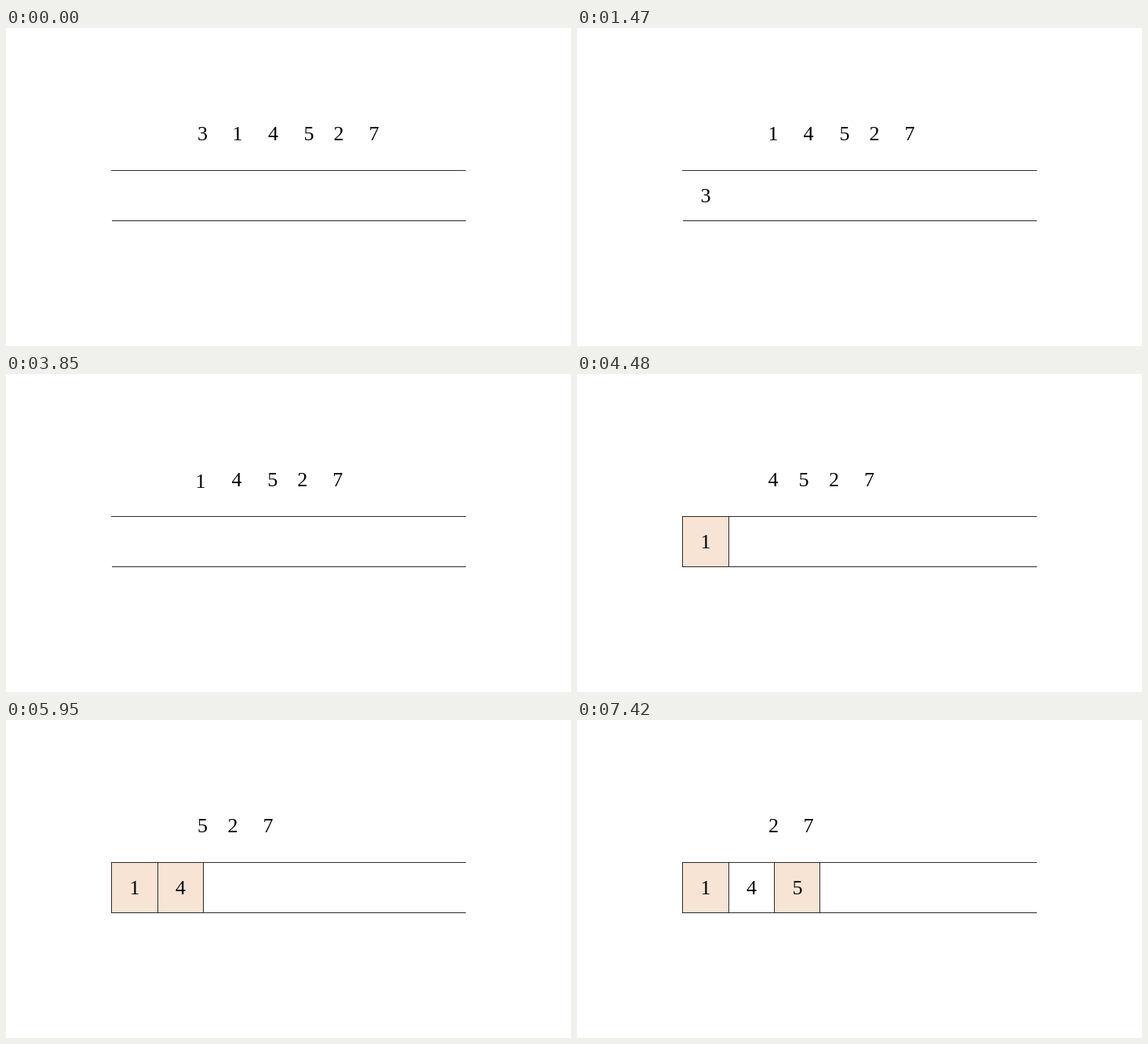
These frames come from a looping animation (720 px wide and 405 px high, 8 s). An HTML page:

```html
<!DOCTYPE html>
<html lang="en">
<head>
<meta charset="utf-8">
<title>Digits entering a stack</title>
<style>
  html, body { margin: 0; width: 100%; height: 100%; overflow: hidden; background: #fff; }
  svg { display: block; width: 720px; height: 405px; }
  text { font: 26px "Liberation Serif", "Times New Roman", serif; text-anchor: middle; fill: #000; }
  rect { shape-rendering: crispEdges; }
  .line { fill: #2a2a2a; }
</style>
</head>
<body>
<svg viewBox="0 0 720 405">
  <rect class="line" x="134" y="181" width="452" height="1"/>
  <rect class="line" x="135" y="245" width="451" height="1"/>
  <g id="cells"></g>
  <g id="digits"></g>
</svg>
<script>
const LOOP = 8000, STEP = 70, STEPS = 10;
const PEACH = '#f8e4d4';
const edges = [134, 193, 251, 309];
const slotCenters = [164, 222.5, 281];
const moveStarts = [910, 3850, 5320, 6790];
const moveEnds = moveStarts.map(at => at + (STEPS - 1) * STEP);
const targetSlots = [0, 0, 1, 2];
const popTime = 2380;

// Centres of the waiting digits after each move
const queues = [
  [250.5, 295, 340.5, 386, 424, 469],
  [250, 295, 341, 379, 424],
  [250, 289, 327.5, 372.5],
  [250.5, 289, 334],
  [250.5, 295]
];

function add(parent, tag, attrs, content = '') {
  const el = document.createElementNS('http://www.w3.org/2000/svg', tag);
  for (const name in attrs) el.setAttribute(name, attrs[name]);
  el.textContent = content;
  return parent.appendChild(el);
}

const cellLayer = document.getElementById('cells');
const digitLayer = document.getElementById('digits');

const cells = slotCenters.map((_, i) => {
  const group = add(cellLayer, 'g', {});
  const left = edges[i], right = edges[i + 1];
  const fill = add(group, 'rect', { x: left + 1, y: 182, width: right - left - 1, height: 63 });
  for (const x of [left, right]) {
    add(group, 'rect', { class: 'line', x, y: 181, width: 1, height: 65 });
  }
  return { group, fill };
});
const digits = [...'314527'].map(d => add(digitLayer, 'text', {}, d));

const show = (el, on) => el.setAttribute('visibility', on ? 'visible' : 'hidden');
const lerp = (a, b, k) => a + (b - a) * k;

function place(i, moved) {
  return i < moved
    ? [slotCenters[targetSlots[i]], 222]
    : [queues[moved][i - moved], 143];
}

function progress(elapsed) {
  const p = Math.min(1, 0.0985 + 0.1156 * Math.floor(elapsed / STEP));
  return (1 - Math.cos(Math.PI * p)) / 2;
}

function draw(t) {
  const moved = moveEnds.filter(end => t >= end).length;
  const moving = moved < moveStarts.length && t >= moveStarts[moved];
  const k = moving ? progress(t - moveStarts[moved]) : 0;

  digits.forEach((el, i) => {
    const from = place(i, moved);
    const to = moving ? place(i, moved + 1) : from;
    el.setAttribute('x', lerp(from[0], to[0], k));
    el.setAttribute('y', lerp(from[1], to[1], k));
  });

  const popped = t >= popTime;
  show(digits[0], !popped);
  show(cells[0].group, popped ? moved >= 2 : moved === 1);
  show(cells[1].group, moved >= 3);
  show(cells[2].group, moved >= 4);
  cells.forEach(({ fill }, i) => fill.setAttribute('fill', i === 1 && moved >= 4 ? '#fff' : PEACH));
}

const start = performance.now();
function tick() {
  draw((performance.now() - start) % LOOP);
  requestAnimationFrame(tick);
}
tick();
</script>
</body>
</html>
```
